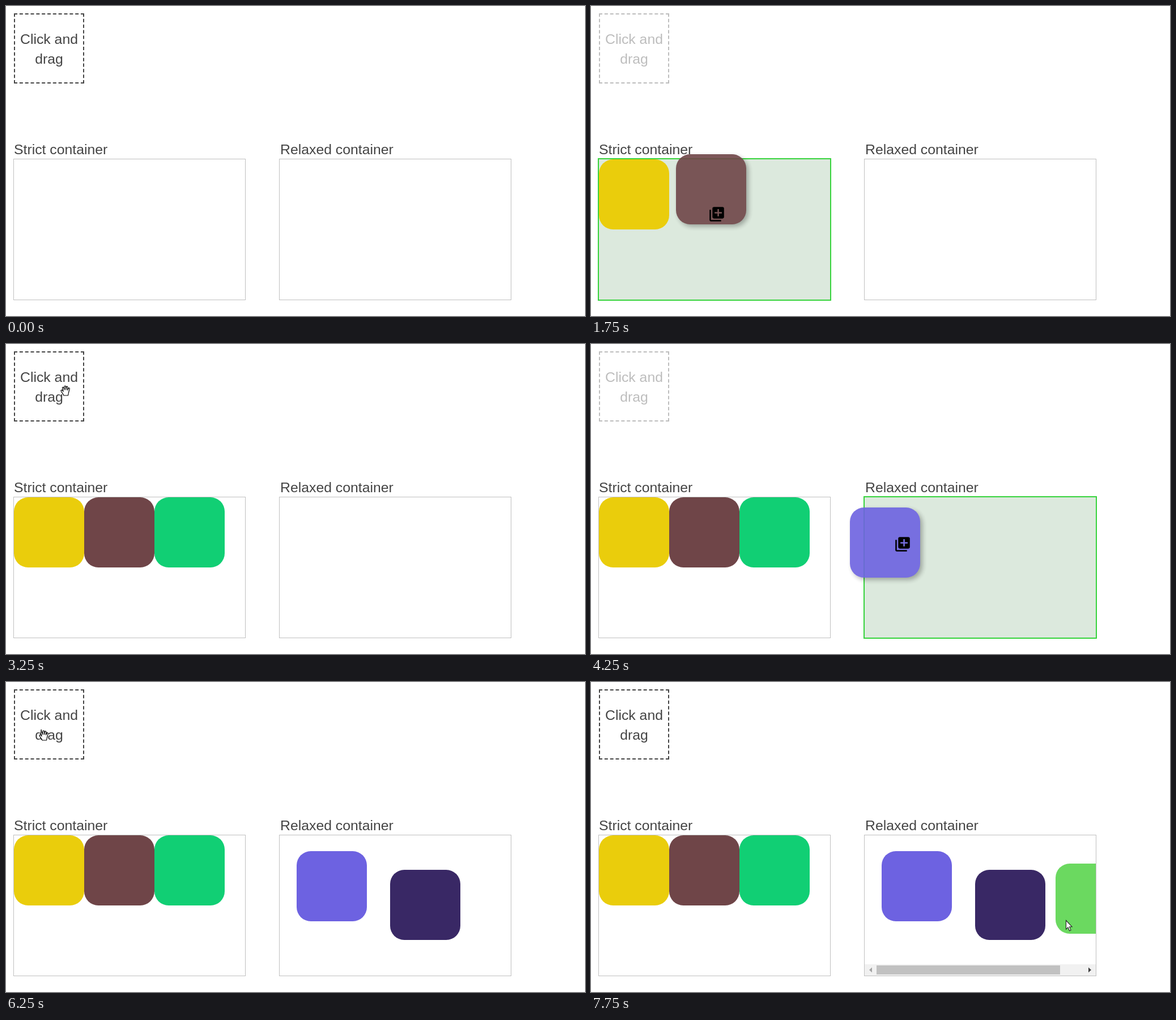
Write an HTML page that moves like this. It is 1022 by 548 pixels and loops after 8000 ms.

```html
<!DOCTYPE html>
<html lang="en">
<head>
<meta charset="utf-8">
<title>Drag and drop containers</title>
<style>
  html, body { margin: 0; width: 100%; height: 100%; overflow: hidden; background: #fff; }
  body { position: relative; font: 24.8px/35px "Liberation Sans", Arial, sans-serif; color: #444; }
  div, svg { position: absolute; box-sizing: border-box; }
  svg { overflow: visible; left: 0; top: 0; }
  #source {
    left: 14px; top: 13px; width: 124px; height: 124px; padding-top: 26px;
    border: 2px dashed #444; text-align: center; white-space: nowrap;
  }
  #source.faded { opacity: .35; }
  .label { top: 236px; white-space: nowrap; }
  .box { top: 270px; width: 410px; height: 250px; border: 1px solid #c0c0c0; }
  .box.over { background: #dce9dd; border-color: #36d33c; box-shadow: 0 0 0 1px #36d33c; }
  .clip { left: 483px; top: 271px; width: 408px; height: 248px; overflow: hidden; }
  .tile { width: 124px; height: 124px; border-radius: 25px; }
  .tile.held { opacity: .9; box-shadow: 4px 4px 8px rgba(0, 0, 0, .33); }
</style>
</head>
<body>
<div id="source">Click and<br>drag</div>
<div class="label" style="left:14px">Strict container</div>
<div class="label" style="left:484px">Relaxed container</div>
<div class="box" style="left:13px"></div>
<div class="box" style="left:482px"></div>
<div id="strict" style="left:0;top:0"></div>
<div class="clip">
  <div id="relaxed" style="left:-483px;top:-271px"></div>
  <svg id="bar" width="408" height="248">
    <path fill="#f1f1f1" d="M0 228h408v20H0z"/>
    <path fill="#c1c1c1" d="M21 230h324v16H21z"/>
    <path fill="#a3a3a3" d="M13 233.500v9l-5-4.500z"/>
    <path fill="#404040" d="M395 233.500v9l5-4.500z"/>
  </svg>
</div>
<div id="held" class="tile held"></div>
<svg id="cursor" width="1" height="1">
  <path id="copy" transform="scale(1.28) translate(-12 -12)" d="M4 6H2v14c0 1.100.9 2 2 2h14v-2H4V6zm16-4H8c-1.100 0-2 .9-2 2v12c0 1.100.9 2 2 2h12c1.100 0 2-.9 2-2V4c0-1.100-.9-2-2-2zm-1 9h-4v4h-2v-4H9V9h4V5h2v4h4v2z"/>
  <path id="hand" transform="translate(-8 -9)" fill="#fff" stroke="#000" stroke-width="1.2" stroke-linejoin="round" d="M6 18C4 14 1 11 1 9.500C1 8 3 8 4 9.500L5 11L3.500 5C3.200 3 5.500 2.700 6 4.500L7 8V2.500C7 .6 9.600 .6 9.600 2.500L9.800 8L10.500 3C10.800 1.400 13 1.600 12.900 3.400L12.600 8.600L14 5.400C14.800 4 16.600 4.700 16.200 6.300L14.500 13L13.500 18Z"/>
  <path id="arrow" fill="#fff" stroke="#222" stroke-width="1.1" d="M.5.5V16L4 12.700L6.500 18.700L9 17.600L6.500 11.700H11Z"/>
</svg>
<script>
const STEP = 250, LOOP = 8000;
const $ = id => document.getElementById(id);
const boxes = [...document.querySelectorAll(".box")];
const boxLeft = [13, 482];

// Each drag: first step, cursor grip inside the tile, tile path per step, resting place.
const drags = [
  { into: "strict", color: "#eacd0c", start: 2, grip: [76, 104], home: [14, 271],
    path: [[30, 60], [26, 165], [22, 262]] },
  { into: "strict", color: "#6f4548", start: 6, grip: [72, 106], home: [138, 271],
    path: [[115, 114], [150, 262]] },
  { into: "strict", color: "#11cf74", start: 10, grip: [69, 112], home: [262, 271],
    path: [[140, 120], [255, 258]] },
  { into: "relaxed", color: "#6d62e1", start: 14, grip: [93, 65], home: [513, 299],
    path: [[300, 0], [550, 70], [495, 215], [457, 289], [513, 299]] },
  { into: "relaxed", color: "#392865", start: 20, grip: [87, 88], home: [678, 332],
    path: [[36, 24], [330, 170], [624, 291], [678, 332]] },
  { into: "relaxed", color: "#6bd960", start: 26, grip: [51, 79], home: [820, 321],
    path: [[200, 80], [560, 230], [757, 306], [800, 315], [820, 321]] }
];

// Pointer between drags, by step.
const idle = {
  1: ["hand", 88, 117], 5: ["hand", 86, 122], 8: ["arrow", 160, 245],
  9: ["hand", 83, 130], 12: ["arrow", 230, 270], 13: ["hand", 104, 82],
  19: ["hand", 100, 102], 24: ["arrow", 430, 240], 25: ["hand", 66, 94],
  31: ["arrow", 838, 421]
};

function place(el, [x, y]) {
  el.style.left = x + "px";
  el.style.top = y + "px";
}

for (const d of drags) {
  d.end = d.start + d.path.length;
  d.tile = document.createElement("div");
  d.tile.className = "tile";
  d.tile.style.background = d.color;
  place(d.tile, d.home);
  $(d.into).append(d.tile);
}

function show(el, on) {
  el.style.display = on ? "" : "none";
}

function setCursor(kind, x, y) {
  for (const id of ["copy", "hand", "arrow"]) show($(id), id === kind);
  place($("cursor"), [x, y]);
}

function draw(time) {
  const step = Math.floor((time % LOOP) / STEP);
  const drag = drags.find(d => step >= d.start && step < d.end);
  const [kind, x, y] = idle[step] || ["none", 0, 0];
  let cx = x, cy = y;

  for (const d of drags) show(d.tile, step >= d.end);
  show($("bar"), step >= drags[5].end);
  show($("held"), drag);
  $("source").classList.toggle("faded", !!drag);

  if (drag) {
    const pos = drag.path[step - drag.start];
    [cx, cy] = pos.map((p, i) => p + drag.grip[i]);
    $("held").style.background = drag.color;
    place($("held"), pos);
  }
  setCursor(drag ? "copy" : kind, cx, cy);

  boxes.forEach((box, i) => {
    const inside = cx > boxLeft[i] && cx < boxLeft[i] + 410 && cy > 270 && cy < 520;
    box.classList.toggle("over", !!drag && inside);
  });
}

const begin = performance.now();
function tick() {
  draw(performance.now() - begin);
  requestAnimationFrame(tick);
}
tick();
</script>
</body>
</html>
```
